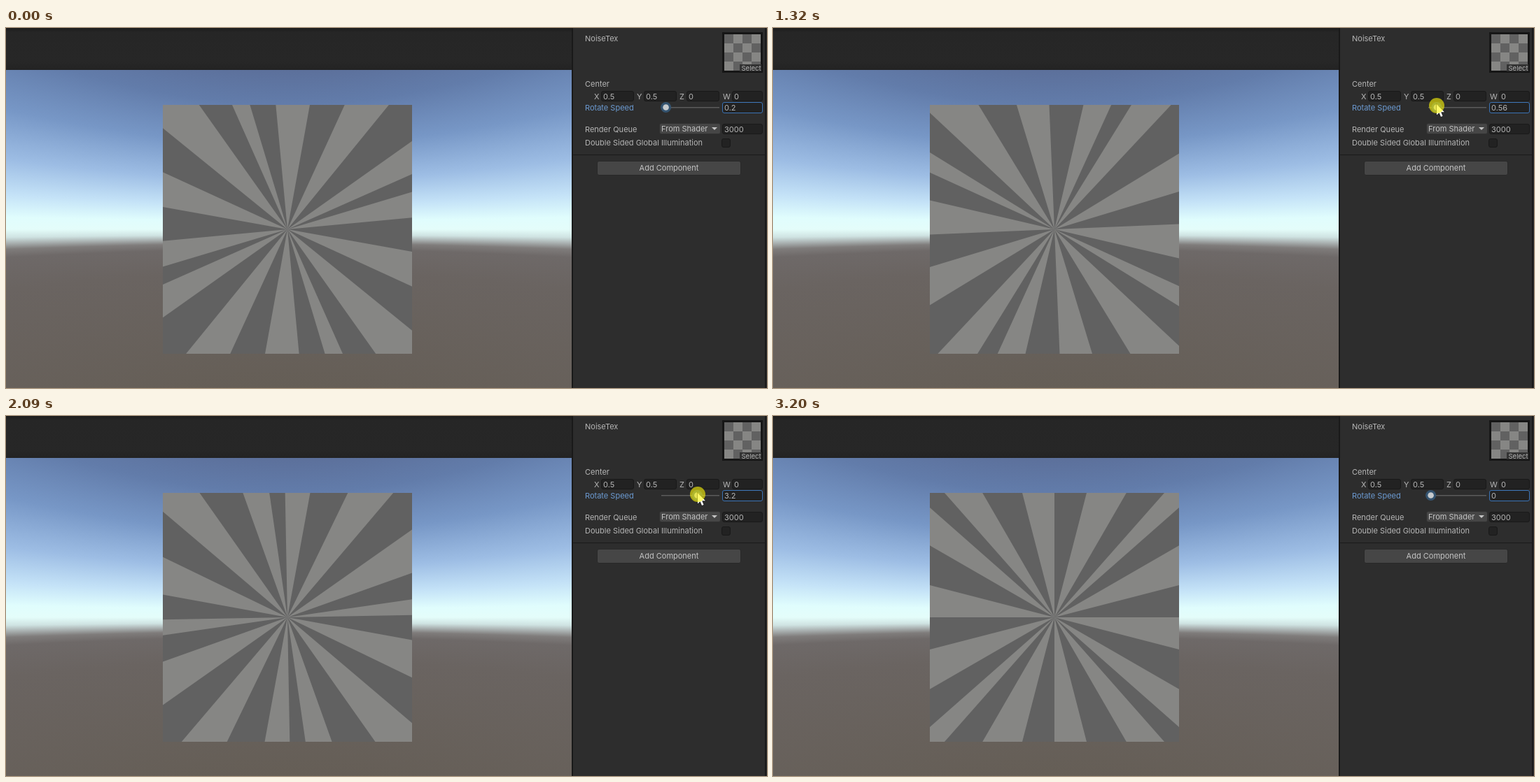
Write an HTML page with a canvas that moves like this. It is 1087 px wide and 515 px high and loops after 3950 ms.

```html
<!DOCTYPE html>
<html lang="en">
<head>
<meta charset="utf-8">
<title>Rotating rays</title>
<style>
  html, body { margin: 0; width: 100%; height: 100%; overflow: hidden; background: #2d2d2d; }
  canvas { display: block; }
</style>
</head>
<body>
<canvas id="stage" width="1087" height="515"></canvas>
<script>
const LOOP = 3950, STEP = 69.56, LAST = 46;
const stage = document.getElementById('stage').getContext('2d');
const backdrop = document.createElement('canvas');
backdrop.width = 1087;
backdrop.height = 515;

// [step, value...] keys, linear in between
const speedKeys = [[0, .2], [17, .2], [19, .5593], [27, 2.9058], [29, 3.31], [32, 2.9651], [36, .2577], [38, 0]];
const cursorKeys = [
  [3, 1050, 449], [4, 1000, 315], [5, 957, 208], [6, 939, 122], [7, 937, 111], [15, 937, 111],
  [17, 941, 109], [19, 948, 109], [27, 987, 109], [29, 992, 109], [32, 980, 112],
  [36, 940, 112], [38, 935, 112], [41, 934, 114], [43, 955, 165], [44, 988, 230], [45, 1022, 400]
];

function at(keys, k) {
  const i = keys.findIndex(key => key[0] >= k);
  if (i < 0) return keys[keys.length - 1].slice(1);
  if (i === 0) return keys[0].slice(1);
  const a = keys[i - 1], b = keys[i], p = (k - a[0]) / (b[0] - a[0]);
  return a.slice(1).map((v, j) => v + (b[j + 1] - v) * p);
}

function rect(c, x, y, w, h, color) {
  c.fillStyle = color;
  c.fillRect(x, y, w, h);
}

function box(c, x, y, w, h, fill, border) {
  c.beginPath();
  c.roundRect(x + .5, y + .5, w - 1, h - 1, 2.5);
  c.fillStyle = fill;
  c.fill();
  c.strokeStyle = border;
  c.lineWidth = 1;
  c.stroke();
}

function text(c, s, x, middle, color = '#b6b6b6', size = 11, align = 'left') {
  c.font = `${size}px Inter, sans-serif`;
  c.textAlign = align;
  c.fillStyle = color;
  c.fillText(s, x, middle + size * .36);
}

function disc(c, x, y, r, color) {
  c.beginPath();
  c.arc(x, y, r, 0, 7);
  c.fillStyle = color;
  c.fill();
}

function drawSky(c) {
  const g = c.createLinearGradient(0, -228, 0, 228);
  const stops = [
    [-228, '#5c709b'], [-178, '#627caa'], [-120, '#7797c6'], [-70, '#9dbde4'], [-35, '#c4e2f7'],
    [-12, '#e0fdfd'], [0, '#e4fdfa'], [8, '#cfe3e2'], [14, '#a9b0b0'], [20, '#7f7c7b'],
    [28, '#6e6968'], [60, '#6a6461'], [228, '#655e56']
  ];
  for (const [y, color] of stops) g.addColorStop((y + 228) / 456, color);
  c.save();
  c.beginPath();
  c.rect(0, 60, 808, 455);
  c.clip();
  c.fillStyle = g;
  // the view widens the bands towards the sides
  for (let x = 0; x < 808; x++) {
    c.setTransform(1, 0, 0, Math.hypot(1, (x - 402) / 394), x, 288);
    c.fillRect(0, -230, 1, 460);
  }
  c.restore();
}

function drawBackdrop(c) {
  rect(c, 0, 0, 1087, 515, '#2d2d2d');
  const bar = c.createLinearGradient(0, 0, 0, 60);
  bar.addColorStop(0, '#1c1c1c');
  bar.addColorStop(.1, '#262626');
  bar.addColorStop(.8, '#272727');
  bar.addColorStop(1, '#232323');
  rect(c, 0, 0, 808, 60, bar);
  drawSky(c);
  rect(c, 808, 0, 2, 515, '#191919');
  rect(c, 1084, 0, 2, 515, '#1a1a1a');
  rect(c, 810, 181, 274, 1, '#1a1a1a');

  text(c, 'NoiseTex', 827, 15);
  rect(c, 1023, 6, 58, 58, '#161616');
  for (let i = 0; i < 16; i++) {
    const col = i % 4, row = i >> 2;
    rect(c, 1026 + col * 13, 9 + row * 13, 13, 13, (col + row) % 2 ? '#868684' : '#616161');
  }
  rect(c, 1048, 52, 31, 10, '#333');
  text(c, 'Select', 1064.5, 57.5, '#b0b0b0', 9.5, 'center');

  text(c, 'Center', 827, 80);
  const axes = [['X', 840, 850, 47, '0.5'], ['Y', 901, 911, 47, '0.5'], ['Z', 962, 972, 47, '0'], ['W', 1024, 1037, 44, '0']];
  for (const [name, x, left, w, value] of axes) {
    text(c, name, x, 98);
    box(c, left, 90, w, 15, '#222', '#191919');
    text(c, value, left + 3, 98);
  }

  text(c, 'Rotate Speed', 827, 114, '#6c9bd2');
  rect(c, 936, 113, 83, 1.5, '#5c5c5c');

  text(c, 'Render Queue', 827, 145);
  box(c, 933, 136, 88, 16, '#464646', '#303030');
  text(c, 'From Shader', 936, 144, '#c4c4c4');
  c.beginPath();
  c.moveTo(1008, 142);
  c.lineTo(1016, 142);
  c.lineTo(1012, 146);
  c.fill();
  box(c, 1023, 137, 58, 15, '#222', '#191919');
  text(c, '3000', 1026, 145);

  text(c, 'Double Sided Global Illumination', 827, 164);
  box(c, 1022, 158, 13, 13, '#222', '#191919');

  box(c, 844, 190, 206, 21, '#464646', '#292929');
  text(c, 'Add Component', 947, 200, '#c4c4c4', 11, 'center');
}

// Rays: a 4 x 4 checker read along a unit circle
const quarter = [0, .25, .5].map(Math.asin)
  .concat(Math.acos(.75), Math.asin(.75), Math.acos(.5), Math.acos(.25));
const edge = i => quarter[i % 7] + Math.floor(i / 7) * Math.PI / 2;

function drawRays(c, turn) {
  c.save();
  c.beginPath();
  c.rect(224, 110, 356, 356);
  c.clip();
  rect(c, 224, 110, 356, 356, '#616161');
  c.translate(402, 288);
  c.rotate(turn - Math.PI / 2);
  c.beginPath();
  for (let i = 1; i < 28; i += 2) {
    c.moveTo(0, 0);
    c.arc(0, 0, 270, edge(i), edge(i + 1));
    c.closePath();
  }
  c.fillStyle = '#868684';
  c.fill();
  c.restore();
}

const arrow = new Path2D('M0 0V15.5L3.6 12.2L6 18L8.6 16.9L6.2 11.3H11Z');

function drawCursor(c, x, y, pressed) {
  c.save();
  c.translate(x, y);
  c.strokeStyle = '#222';
  c.lineWidth = 1.4;
  c.stroke(arrow);
  c.fillStyle = '#fff';
  c.fill(arrow);
  c.restore();
  if (pressed) disc(c, x, y + 2, 11, 'rgba(250, 243, 10, .62)');
}

function draw(ms) {
  const k = Math.min(LAST, Math.floor((ms + 8) / STEP));
  const [speed] = at(speedKeys, k);
  stage.drawImage(backdrop, 0, 0);
  drawRays(stage, speed * (57.13 + k * STEP / 1000));

  const knob = 939.6 + speed * 14.95;
  disc(stage, knob, 113.5, 7.5, '#34536f');
  disc(stage, knob, 113.5, 4.3, '#c6cacd');
  box(stage, 1023, 106, 58, 16, '#222', '#3b73b5');
  text(stage, String(+speed.toFixed(2)), 1026, 114);

  if (k >= 3 && k < LAST) drawCursor(stage, ...at(cursorKeys, k), k >= 18 && k < 40);
}

function tick() {
  draw(performance.now() % LOOP);
  requestAnimationFrame(tick);
}

drawBackdrop(backdrop.getContext('2d'));
tick();
</script>
</body>
</html>
```
